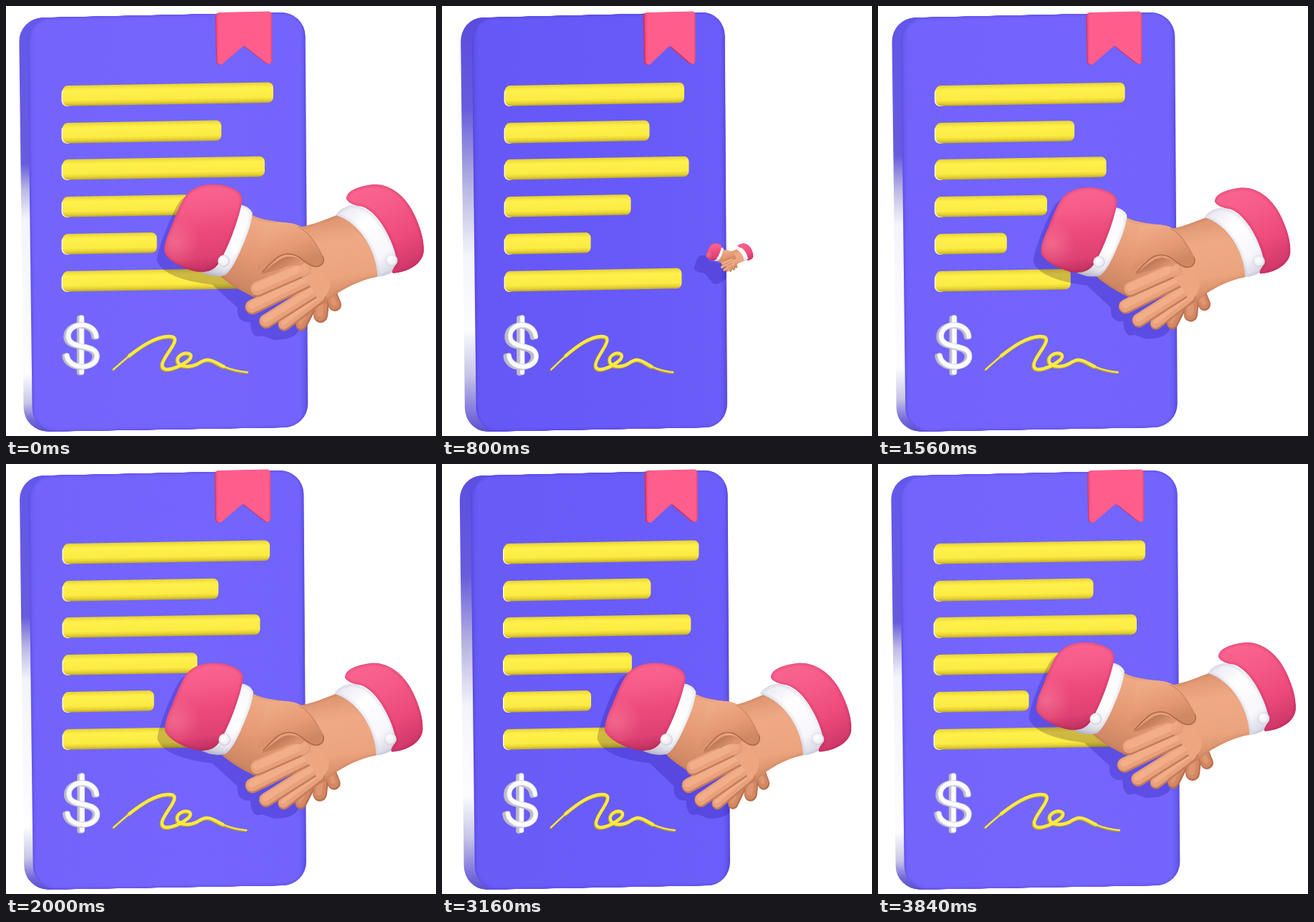
Animation of 600 by 600 pixels, one loop 4000 ms. Source, as an HTML page with a canvas:

```html
<!DOCTYPE html>
<html lang="en">
<head>
<meta charset="utf-8">
<title>Contract handshake</title>
<style>
html, body { margin: 0; width: 100%; height: 100%; overflow: hidden; background: #fff; }
canvas { display: block; width: 600px; height: 600px; }
</style>
</head>
<body>
<canvas id="stage" width="600" height="600"></canvas>
<script>
const ctx = document.getElementById('stage').getContext('2d');
const LOOP = 4000, STEP = 40;

const clamp = x => Math.max(0, Math.min(1, x));
const lerp = (a, b, k) => a + (b - a) * k;
const swing = p => (1 - Math.cos(Math.PI * p)) / 2;
const easeInOut = p => p < 0.5 ? 4 * p ** 3 : 1 - 4 * (1 - p) ** 3;
const backIn = p => p * p * (2.7 * p - 1.7);
const mix = (a, b, k) => `rgb(${a.map((v, i) => Math.round(lerp(v, b[i], k)))})`;

function gradient(x0, y0, x1, y1, ...stops) {
  const g = ctx.createLinearGradient(x0, y0, x1, y1);
  stops.forEach(([at, color]) => g.addColorStop(at, color));
  return g;
}

// Scales horizontally around a fixed x.
function squeeze(x, k) {
  ctx.translate(x, 0);
  ctx.scale(k, 1);
  ctx.translate(-x, 0);
}

function isolated(paint) {
  ctx.save();
  paint();
  ctx.restore();
}

function squeezed(x, k, paint) {
  isolated(() => { squeeze(x, k); paint(); });
}

function shifted(dx, dy, paint) {
  isolated(() => { ctx.translate(dx, dy); paint(); });
}

function stroke(path, width, color) {
  ctx.lineWidth = width;
  ctx.strokeStyle = color;
  ctx.stroke(path);
}

// Motion

// 1 when the card faces the viewer, 0 when it is turned away the most.
function facing(t) {
  const turns = [[0, 1], [900, 0], [1780, 1], [2880, 0], [3840, 1], [LOOP, 1]];
  const i = turns.findIndex(([time]) => time > t);
  const [t0, a] = turns[i - 1], [t1, b] = turns[i];
  return lerp(a, b, swing((t - t0) / (t1 - t0)));
}

function handScale(t) {
  return t < 835 ? 1 - backIn(clamp((t - 40) / 795)) : easeInOut(clamp((t - 860) / 870));
}

function handDrop(t) {
  return t < 1480 || t > 3800 ? 0 : 29.5 * swing((t - 1480) / 580);
}

function barLength(t, row) {
  const start = 750 + 50 * row, turn = start + 305;
  if (t < start) return 1;
  if (t < turn) return 1 - swing((t - start) / 305);
  return 1 - Math.exp(-(t - turn) * 0.0048);
}

// Document

function roundPoly(points, r) {
  const path = new Path2D(), n = points.length;
  const [ax, ay] = points[0], [bx, by] = points[n - 1];
  path.moveTo((ax + bx) / 2, (ay + by) / 2);
  points.forEach(([x, y], i) => path.arcTo(x, y, ...points[(i + 1) % n], r));
  path.closePath();
  return path;
}

const card = roundPoly([[30, 17], [417.5, 8.5], [421.5, 587.5], [37, 594]], 33);
const ribbon = roundPoly([[293, 9], [371, 7.5], [371.5, 86], [332, 55], [294.5, 87.5]], 5);
const signature = new Path2D('M150 507C172 488 196 464 226 461C252 460 218 488 218 501C218 513 241 505 255 494' +
  'C266 484 246 480 240 491C236 503 254 506 268 499C284 488 290 497 304 503C316 508 326 510 337 511');
const signatureCore = new Path2D('M172 488C190 474 208 462 226 461C252 460 218 488 218 501C218 513 241 505 255 494' +
  'C266 484 246 480 240 491C236 503 254 506 268 499C284 488 290 497 304 503');
const dollarS = new Path2D('M126 461C124 440 88 440 87 460C86 481 127 469 127 489C126 508 88 508 85 488');
const dollarBar = new Path2D('M105.5 435V511');
const bars = [[111, 373], [163, 300.5], [214, 361], [266, 272], [318, 210.5], [370, 350]];

function drawCard(q) {
  ctx.fillStyle = gradient(0, 10, 0, 595,
    [0, mix([88, 75, 222], [100, 88, 236], q)], [lerp(0.22, 0.36, q), '#675cdc'], [0.42, '#b9b8e2'],
    [lerp(0.58, 0.49, q), '#f4f4fb'], [lerp(0.75, 0.86, q), '#fdfdff'],
    [lerp(0.86, 0.93, q), '#c7c6e6'], [0.97, '#7268da'], [1, '#5a4fcc']);
  for (let d = lerp(17.5, 12, q); d > 0; d--) shifted(-d, 0, () => ctx.fill(card));

  ctx.fillStyle = gradient(30, 0, 422, 0,
    [0, mix([92, 78, 228], [104, 90, 240], q)],
    [0.03, mix([102, 88, 245], [115, 101, 252], q)],
    [0.6, mix([104, 90, 248], [116, 102, 253], q)],
    [0.97, mix([107, 93, 249], [114, 100, 252], q)],
    [1, mix([90, 77, 224], [96, 83, 232], q)]);
  ctx.fill(card);
  isolated(() => {
    ctx.clip(card);
    stroke(card, 7, 'rgba(62,46,185,.08)');
    stroke(card, 3, 'rgba(62,46,185,.12)');
  });
}

function drawBar(y, right, length) {
  const width = (right - 78) * length;
  if (width < 2) return;
  const box = (x, top, w, h) => {
    ctx.beginPath();
    ctx.roundRect(x, top, Math.max(w, 0), h, Math.min(7.5, Math.max(w, 0) / 2));
    ctx.fill();
  };
  isolated(() => {
    ctx.transform(1, -0.016, 0, 1, 0, 1.3);
    ctx.fillStyle = '#fffbe4';
    box(77.5, y + 3, Math.min(16, width), 26);
    ctx.fillStyle = gradient(0, y, 0, y + 28.5,
      [0, '#e3cf36'], [0.13, '#f6e440'], [0.26, '#fff04b'], [0.72, '#fbeb43'], [0.88, '#e6d133'], [1, '#c0a926']);
    box(79, y, width - 1, 28.5);
  });
}

function drawContent(t, q) {
  ctx.fillStyle = '#c93768';
  const thickness = lerp(2.5, 1, q);
  shifted(-thickness, 0.5, () => ctx.fill(ribbon));
  ctx.fillStyle = gradient(293, 0, 372, 0, [0, '#e84a7c'], [0.06, '#ff5d8c'], [0.95, '#ff5f8d'], [1, '#d94272']);
  ctx.fill(ribbon);

  bars.forEach(([y, right], row) => drawBar(y, right, barLength(t, row)));

  ctx.lineCap = ctx.lineJoin = 'round';
  const side = lerp(5, 3, q);
  for (const glyph of [dollarBar, dollarS]) {
    for (let d = side; d > 0; d--) shifted(-d, d / 5, () => stroke(glyph, 7.5, '#bcbcca'));
    stroke(glyph, 7.5, '#e2e2ec');
    stroke(glyph, 5.5, '#fbfbff');
  }
  shifted(-0.8, 1, () => {
    stroke(signature, 2.6, '#bda52c');
    stroke(signatureCore, 5, '#bda52c');
  });
  stroke(signature, 2.4, '#f7e540');
  stroke(signatureCore, 4.4, '#fbea43');
}

// Handshake

const leftSleeve = new Path2D('M256 259C268 249 289 245 311 252C326 257 332 264 329 276C323 304 309 340 297 359' +
  'C289 371 277 373 262 370C244 365 229 357 222 346C218 338 225 320 231 307C238 289 246 267 256 259Z');
const leftCuff = new Path2D('M326 277Q340 279 344 289Q343 306 330 335Q316 369 305 376Q288 380 271 371Z');
const rightSleeve = new Path2D('M475 270C474 259 488 252 511 249C537 247 559 267 570 291C578 308 584 326 583 343' +
  'C581 360 561 372 540 373Q536 371 546 358C541 328 520 288 497 280Q480 278 475 270Z');
const rightCuff = new Path2D('M460 292Q466 281 482 278C509 278 532 309 546 347Q551 361 541 370Q531 377 518 378' +
  'C518 344 494 302 460 292Z');
const leftHand = new Path2D('M332 285L343 291C359 301 390 300 407 306C425 318 437 336 430 362L385 400L345 406' +
  'C326 397 310 387 299 377L285 365Z');
const rightHand = new Path2D('M407 309C430 305 447 297 461 292L475 288L535 365L518 378C493 383 475 393 461 402' +
  'C447 414 434 423 421 420L385 383L379 363L405 340Z');
const thumb = new Path2D('M362 303C380 301 398 301 408 306C417 309 430 325 435 335C441 345 446 355 440 361' +
  'C432 368 421 359 411 352C399 343 385 345 374 354L350 370Z');
const thumbEdge = new Path2D('M358 371Q366 361 377 352C388 344 400 344 411 352C421 360 432 368 440 361Q445 357 442 349');
const thumbTop = new Path2D('M408 308Q421 314 434 335Q440 345 442 350');
const crease = new Path2D('M355 375Q372 360 385 352Q402 345 417 358L411 363Q398 360 385 367Z');
const knuckles = new Path2D('M411 357C425 358 443 366 452 386C453 398 445 410 435 412Q431 397 422 389Q416 378 407 374Z');
const outline = new Path2D('M256 259C268 249 289 245 311 252Q330 259 330 278L344 290Q390 298 407 308L461 292' +
  'L475 270Q484 251 511 249C550 247 586 314 583 343Q580 371 540 373L518 378L468 404Q468 423 448 426' +
  'Q450 439 435 439L420 440Q415 455 385 455Q372 450 368 449Q353 455 352 430Q332 431 334 410L299 378' +
  'Q233 370 222 346C218 338 246 267 256 259Z');

// Each finger: base, tip, thickness.
const farFingers = [[425, 420, 412, 445, 16], [442, 405, 439, 432, 20], [452, 400, 459, 417, 18]];
const nearFingers = [[438, 407, 388, 445, 17], [433, 396, 363, 440, 20], [422, 382, 344, 420, 21], [415, 367, 351, 395, 22]];

function drawFinger([x0, y0, x1, y1, width], edge, skin, light) {
  const line = new Path2D(`M${x0} ${y0}L${x1} ${y1}`);
  stroke(line, width, edge);
  shifted(-0.6, -1, () => stroke(line, width - 3, skin));
  shifted(-1.2, -2.5, () => stroke(line, width - 11, light));
}

function drawButton(x, y) {
  const g = ctx.createRadialGradient(x - 2, y - 3, 1, x, y, 9);
  g.addColorStop(0, '#fff');
  g.addColorStop(0.65, '#f0eff6');
  g.addColorStop(1, '#c9c8d6');
  ctx.fillStyle = g;
  ctx.beginPath();
  ctx.arc(x, y, 8.5, 0, 2 * Math.PI);
  ctx.fill();
}

function fill(path, paint, rim) {
  isolated(() => {
    ctx.clip(path);
    ctx.fillStyle = paint;
    ctx.fill(path);
    if (rim) {
      stroke(path, 8, rim);
      stroke(path, 3, rim);
    }
  });
}

function drawLeftSleeve() {
  fill(leftCuff, gradient(332, 280, 290, 378, [0, '#f9f9fd'], [0.55, '#fff'], [0.82, '#ececf4'], [1, '#bdbccc']), 'rgba(130,130,160,.09)');
  fill(leftSleeve, gradient(270, 249, 288, 374, [0, '#fb6492'], [0.26, '#f65b89'], [0.52, '#ec4a7b'], [0.8, '#df4173'], [1, '#b42d5b']), 'rgba(165,20,75,.11)');
  const glow = ctx.createRadialGradient(236, 330, 2, 236, 330, 34);
  glow.addColorStop(0, 'rgba(255,150,165,.38)');
  glow.addColorStop(1, 'rgba(255,150,165,0)');
  fill(leftSleeve, glow);
  drawButton(304, 356);
}

function drawRightSleeve() {
  fill(rightCuff, gradient(470, 285, 540, 370, [0, '#ebeaf3'], [0.3, '#fff'], [0.75, '#f7f7fc'], [1, '#d6d5e2']), 'rgba(130,130,160,.09)');
  fill(rightSleeve, gradient(500, 250, 565, 372, [0, '#fa648f'], [0.3, '#f65b88'], [0.65, '#ec4a7a'], [1, '#c93467']), 'rgba(165,20,75,.11)');
  drawButton(538, 355);
}

function drawRightHand() {
  farFingers.forEach(f => drawFinger(f, '#b96f4f', '#d38863', '#df9670'));
  fill(rightHand, gradient(440, 295, 460, 415, [0, '#dc946f'], [0.3, '#efaa85'], [0.7, '#eba47e'], [1, '#d08863']), 'rgba(155,80,50,.07)');
  nearFingers.forEach(f => drawFinger(f, '#c47d5b', '#e9a17b', '#f1ae89'));
  fill(knuckles, gradient(405, 370, 445, 390, [0, 'rgba(236,165,127,.35)'], [0.6, '#eda680']));
}

function drawThumb() {
  fill(crease, gradient(380, 348, 392, 368, [0, '#b26c4b'], [1, '#dd956f']));
  fill(thumb, gradient(385, 302, 405, 360, [0, '#efab86'], [0.55, '#e69b75'], [1, '#d08863']));
  stroke(thumbEdge, 1.8, '#b26c4b');
  stroke(thumbTop, 1.3, '#cb8562');
}

// The arms lie at different depths, so each part turns around its own axis.
function drawHands(q) {
  ctx.lineCap = ctx.lineJoin = 'round';
  const turn = 1 - q;
  const leftTurn = 1 - 0.12 * turn, rightTurn = 1 - 0.11 * turn;
  squeezed(443, leftTurn, () =>
    fill(leftHand, gradient(365, 300, 330, 405, [0, '#efab86'], [0.45, '#e69b75'], [1, '#c8825e']), 'rgba(155,80,50,.08)'));
  squeezed(345, rightTurn, drawRightHand);
  squeezed(443, leftTurn, drawThumb);
  squeezed(45, 1 + 0.044 * turn, drawLeftSleeve);
  squeezed(875, 1 + 0.05 * turn, drawRightSleeve);
}

function placeHands(t, dx, dy, paint) {
  const s = handScale(t);
  if (s < 0.005) return;
  isolated(() => {
    ctx.translate(402 + dx, 351 + handDrop(t) + dy);
    ctx.scale(s, s);
    ctx.translate(-402, -351);
    paint();
  });
}

function drawShadow(t, q) {
  const offset = lerp(18, 11, clamp(handScale(t)));
  placeHands(t, -offset, offset, () => {
    squeeze(347, lerp(0.938, 1, q));
    ctx.globalCompositeOperation = 'multiply';
    ctx.fillStyle = '#cec6e6';
    ctx.fill(outline);
  });
}

function drawScene(t) {
  const q = facing(t);
  ctx.fillStyle = '#fff';
  ctx.fillRect(0, 0, 600, 600);

  const cardTurn = lerp(0.908, 1, q);
  squeezed(160, cardTurn, () => drawCard(q));
  squeezed(178, lerp(0.907, 1, q), () => drawContent(t, q));
  squeezed(160, cardTurn, () => {
    ctx.clip(card);
    ctx.setTransform(1, 0, 0, 1, 0, 0);
    drawShadow(t, q);
  });
  placeHands(t, 0, 0, () => drawHands(q));
}

const begin = performance.now();
function frame() {
  const elapsed = (performance.now() - begin) % LOOP;
  const t = Math.floor(elapsed / STEP) * STEP;
  drawScene(t < 80 ? 0 : Math.min(t, 3840));
  requestAnimationFrame(frame);
}
frame();
</script>
</body>
</html>
```
